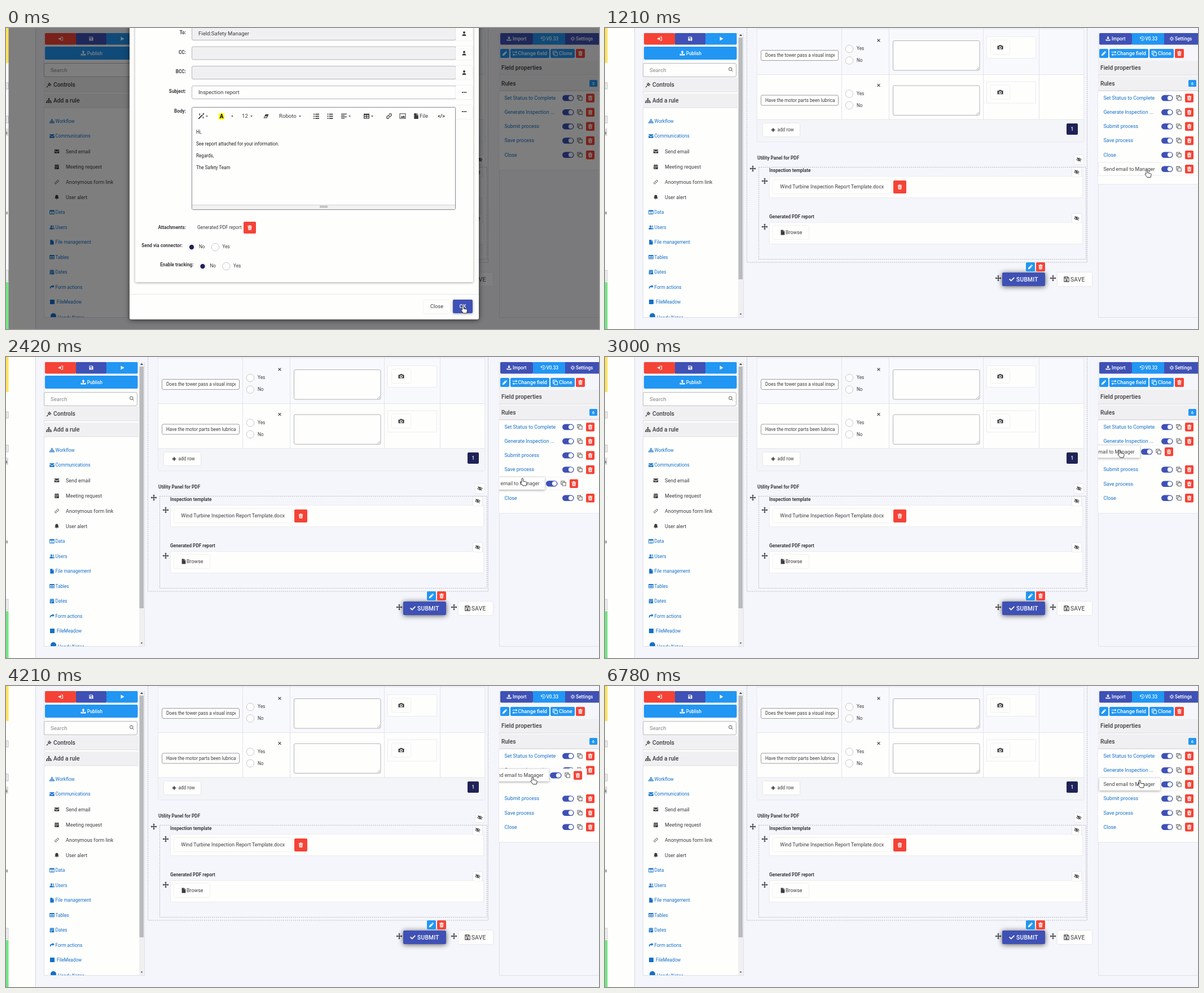
An HTML page for the animation above (6.85 s loop, 1051 by 533 pixels).

```html
<!DOCTYPE html>
<html lang="en">
<head>
<meta charset="utf-8">
<title>Form designer: reordering a rule</title>
<style>
html, body { margin: 0; width: 100%; height: 100%; overflow: hidden; background: #f5f6fb; }
svg { display: block; width: 1051px; height: 533px; font-family: Roboto, sans-serif; }
text { white-space: pre; }
.soft { filter: drop-shadow(0 .5px 1px rgba(0,0,0,.13)); }
.lift { filter: drop-shadow(0 1.5px 2px rgba(0,0,0,.36)); }
.glow { filter: drop-shadow(0 1px 5px rgba(0,0,0,.65)); }
</style>
</head>
<body>
<svg id="stage" viewBox="0 0 1051 533"></svg>
<script>
const WHITE = '#fefefd', INK = '#3c3c40', BLUE = '#2196f3', INDIGO = '#3f51b5',
  RED = '#f44336', LINK = '#1470c8', NAVY = '#1f2257', GREY = '#f0f0f2', LINE = '#dfe1e8';

// Icons on a 16 x 16 grid; a leading ~ means outlined instead of filled.
const ICONS = {
  exit: 'M0 6h5V2l6 6-6 6v-4H0zM9 1h7v14H9v-2h5V3H9z',
  save: 'M1 1h11l3 3v11H1zM3 3v4h8V3zM8 9a2 2 0 100 4 2 2 0 100-4z',
  floppy: '~M1 1h11l3 3v11H1zM4 1v5h7V1M8 9a2 2 0 100 4 2 2 0 100-4z',
  play: 'M3 1l12 7-12 7z',
  upload: 'M8 0l5 5h-3v6H6V5H3zM0 10h4v2h8v-2h4v5H0z',
  download: 'M6 0h4v5h3l-5 6-5-6h3zM0 10h3v2h10v-2h3v5H0z',
  search: '~M6.500 1a5.500 5.500 0 100 11 5.500 5.500 0 000-11zM10.500 10.500L15 15',
  gavel: 'M9 0l7 7-2 2-7-7zM6 3l7 7-2 2-3-3-6 7-2-2 7-6-3-3z',
  sitemap: 'M6 1h4v4H9v2h5v4h2v4h-4v-4V9H9v2h1v4H6v-4h1V9H4v6H0v-4h2V7h5V5H6z',
  mail: 'M0 2h16v2L8 9 0 4zM0 6l8 5 8-5v8H0z',
  calendar: 'M1 2h3V0h2v2h4V0h2v2h3v3H1zM1 6h14v10H1zM4 8v2h3V8zM9 8v2h3V8zM4 12v2h3v-2z',
  link: '~M7 9a3 3 0 004 0l3-3a3 3 0 00-4-4L8 4M9 7a3 3 0 00-4 0l-3 3a3 3 0 004 4l2-2',
  bell: 'M8 0c5 1 5 4 5 7 0 3 1 4 2 5H1c1-1 2-2 2-5 0-3 0-6 5-7zM6 13h4a2 2 0 01-4 0z',
  data: 'M0 1h16v14H0zM2 5v8h5V5zM9 5v8h5V5z',
  users: 'M6 2a3 3 0 110 6 3 3 0 010-6zM0 15c0-8 12-8 12 0zM11 2a3 3 0 110 6zM13 15c0-3 0-4-2-6 4 0 5 2 5 6z',
  file: 'M2 0h7v5h5v11H2zM10 0l4 4h-4z',
  table: 'M0 1h16v14H0zM2 5v3h5V5zM9 5v3h5V5zM2 10v3h5v-3zM9 10v3h5v-3z',
  share: 'M10 1l6 5-6 5V8C5 8 3 10 3 15-1 9 2 4 10 4z',
  trash: 'M1 2h4l1-2h4l1 2h4v2H1zM2 5h12l-1 11H3zM5 7v7h1V7zM7.500 7v7h1V7zM10 7v7h1V7z',
  pencil: 'M0 16l1-5 8-8 4 4-8 8zM10 2l2-2 4 4-2 2z',
  swap: 'M0 3h11V0l5 4-5 4V5H0zM16 11H5V8l-5 4 5 4v-3h11z',
  clone: '~M5 5h10v10H5zM11 5V1H1v10h4',
  history: '~M1 3v4h4M2 7a6.500 6.500 0 112 5M8 4v5l3 1',
  gear: '~M8 4a4 4 0 100 8 4 4 0 000-8zM8 0v4M8 12v4M0 8h4M12 8h4M2.500 2.500l3 3M10.500 10.500l3 3M2.500 13.500l3-3M10.500 5.500l3-3',
  hidden: '~M1 8c3-6 11-6 14 0-3 6-11 6-14 0zM8 6a2 2 0 100 4 2 2 0 000-4M2 1l12 14',
  move: 'M8 0l3 3H9v4h4V5l3 3-3 3V9H9v4h2l-3 3-3-3h2V9H3v2L0 8l3-3v2h4V3H5z',
  cross: 'M3 1l5 5 5-5 2 2-5 5 5 5-2 2-5-5-5 5-2-2 5-5-5-5z',
  camera: 'M0 4h4l1-2h6l1 2h4v10H0zM8 5a4 4 0 100 8 4 4 0 000-8zM8 7a2 2 0 110 4 2 2 0 010-4z',
  plus: 'M6 1h4v5h5v4h-5v5H6v-5H1V6h5z',
  check: 'M0 8l2-2 4 4 8-8 2 2L6 14z',
  user: 'M8 0a4 4 0 110 8 4 4 0 010-8zM1 16c0-9 14-9 14 0z',
  dots: 'M0 6h4v4H0zM6 6h4v4H6zM12 6h4v4h-4z',
  caret: 'M2 4h12l-6 7z',
  wand: 'M0 14L10 4l2 2L2 16zM11 3l3-3 2 2-3 3zM3 1h2v5H3zM12 9h2v5h-2z',
  eraser: 'M6 2h10l-5 12H0zM4 9l-1 3h7l1-3z',
  bullets: 'M0 1h3v3H0zM5 1h11v3H5zM0 7h3v3H0zM5 7h11v3H5zM0 13h3v3H0zM5 13h11v3H5z',
  align: 'M0 1h16v2H0zM0 5h10v2H0zM0 9h16v2H0zM0 13h10v2H0z',
  image: 'M0 1h16v14H0zM1.500 2.500v11h13v-11zM3 12l3-5 2 3 3-4 3 6z'
};

const rect = (x, y, w, h, fill = WHITE, rx = 0, stroke = 'none', extra = '') =>
  `<rect x="${x}" y="${y}" width="${w}" height="${h}" rx="${rx}" fill="${fill}" stroke="${stroke}" ${extra}/>`;
const soft = (x, y, w, h, rx = 2, fill = WHITE) => rect(x, y, w, h, fill, rx, 'none', 'class="soft"');
const outline = (x, y, w, h, stroke, fill = WHITE) => rect(x + .5, y + .5, w - 1, h - 1, fill, 2.5, stroke);
// cy is the middle of the capitals
const text = (x, cy, str, size = 8.9, fill = INK, weight = 400, extra = '') =>
  `<text x="${x}" y="${cy + size * .36}" font-size="${size}" fill="${fill}" font-weight="${weight}" ${extra}>${str}</text>`;
const label = (x, cy, str, extra) => text(x, cy, str, 8.2, INK, 700, extra);
const END = 'text-anchor="end"', MID = 'text-anchor="middle"';
const icon = (name, cx, cy, size = 10, fill = INK) => {
  const d = ICONS[name], s = size / 16, line = d[0] === '~';
  return `<path transform="translate(${cx - size / 2} ${cy - size / 2}) scale(${s})" d="${line ? d.slice(1) : d}" ` +
    (line ? `fill="none" stroke="${fill}" stroke-width="1.8"/>` : `fill="${fill}" fill-rule="evenodd"/>`);
};
const path = (d, stroke = LINE, extra = '') => `<path d="${d}" fill="none" stroke="${stroke}" ${extra}/>`;
const radio = (x, y, on) => `<circle cx="${x}" cy="${y}" r="6.700" fill="${WHITE}" stroke="${on ? '#ececf0' : '#c9c9cc'}"/>` +
  (on ? `<circle cx="${x}" cy="${y}" r="4.200" fill="${NAVY}"/>` : '');
const square = (x, y, w, h, name, fill) => rect(x, y, w, h, fill, 2) + icon(name, x + w / 2, y + h / 2, 8.5, WHITE);
const header = (x, y, w, str, pad) => rect(x, y, w, 25, GREY) + path(`M${x} ${y + 25}h${w}`, '#dedee2') +
  text(x + pad, y + 12.8, str, 10.25, INK, 500);

function edgeWindow() {
  return rect(0, 0, 52, 533) + rect(0, 0, 4.500, 62, '#ffe25a') + rect(0, 450, 4.500, 83, '#72e583') +
    rect(0, 97, 4, 11, GREY, 0, '#bbb') + rect(0, 156, 4, 12, GREY, 0, '#bbb') + rect(0, 178, 4, 13, '#ddd') +
    text(-1, 185, 's', 7, '#333') + text(0, 327, 'll', 7, '#333') + rect(0, 429, 4, 19, GREY, 0, '#ccc') +
    path('M52.500 0v533', '#d5d7df');
}

function leftPanel() {
  const items = [['sitemap', 'Workflow'], ['mail', 'Communications'], ['mail', 'Send email', 1],
    ['calendar', 'Meeting request', 1], ['link', 'Anonymous form link', 1], ['bell', 'User alert', 1],
    ['data', 'Data'], ['users', 'Users'], ['file', 'File management'], ['table', 'Tables'],
    ['calendar', 'Dates'], ['share', 'Form actions'], ['', 'FileMeadow']];
  const frame = rect(67.500, 9.500, 178, 503, WHITE, 0, LINE) +
    rect(69, 9, 55, 20.500, RED, 2) + rect(124, 9, 54, 20.500, INDIGO) + rect(178, 9, 55.500, 20.500, BLUE, 2) +
    icon('exit', 97, 19, 8, WHITE) + icon('save', 151, 19, 8, WHITE) + icon('play', 206, 19, 8, WHITE) +
    rect(69, 33, 164.500, 23, BLUE, 2) + icon('upload', 137, 44.500, 9, WHITE) + text(143.700, 44.700, 'Publish', 8.2, WHITE, 500) +
    outline(67, 62, 166, 25, '#b5b6ba') + text(79, 74.500, 'Search', 9.6, '#85868c') + icon('search', 223, 73.500, 8) +
    header(67, 88, 168, 'Controls', 17) + header(67, 116, 168, 'Add a rule', 17) +
    icon('gavel', 76, 101, 9) + icon('sitemap', 76, 128.500, 9.500) +
    rect(236, 9, 9, 503, '#f0f0f1') + rect(236.500, 17, 7.500, 428, '#babbbe') +
    icon('caret', 240.500, 507, 5) + `<path d="M238 14h5l-2.500-3z" fill="${INK}"/>`;
  let y = 165;
  const list = items.map(([name, str, sub], i) => {
    if (i) y += sub ? 27.1 : 26.45;
    return sub ? icon(name, 90, y, 8.500) + text(106, y, str) :
      (name ? icon(name, 81.500, y, 8.500, LINK) : rect(78, y - 4, 8, 8, LINK)) + text(name ? 87.500 : 90, y, str, 8.2, LINK);
  }).join('');
  const cutOff = `<circle cx="84" cy="510" r="5" fill="${LINK}"/>` + text(92, 513, 'Handy Notes', 8.2, LINK);
  return frame + `<g clip-path="url(#list)">${list}${cutOff}</g>`;
}

function tableRow(y, question) {
  return icon('cross', 485, y + 22, 6.500) +
    outline(276, y + 39, 138, 19, '#9c9da1') +
    text(284, y + 48.500, question, 8.2, INK, 400, 'clip-path="url(#cell)"') +
    radio(433, y + 37) + text(446, y + 36.500, 'Yes', 8.2) + radio(433, y + 57.500) + text(446, y + 57.500, 'No', 8.2) +
    outline(510, y + 22, 154.500, 53.500, '#b0b1b5') + path(`M658 ${y + 74}l5-5M661 ${y + 74}l2-2`, '#888', 'stroke-width=".7"') +
    rect(676.500, y + 15.500, 87, 38, WHITE, 0, '#ececf1') + soft(684, y + 22, 33, 24) + icon('camera', 700.500, y + 34, 10);
}

function formArea() {
  const dash = 'stroke-dasharray="2 1.500"';
  const eye = (x, y) => soft(x, y, 16, 16) + icon('hidden', x + 8, y + 8, 9);
  const card = y => rect(291.500, y + .5, 555, 38, WHITE, 0, '#ececf1');
  return path('M251.500 0V415H854.500V0', '#b9bbc4', dash) +
    soft(270, -4, 578, 205, 0) + rect(270, 0, 578, 82, '#f8f9fd') + rect(270, 162, 578, 39, '#f4f5f9') +
    path('M270 1.500h578M270 82.500h578M270 162h578M419.500 0v162M503.500 0v162M670.500 0v162M769.500 0v162', '#e2e4ea') +
    tableRow(0, 'Does the tower pass a visual inspection?') + tableRow(79.500, 'Have the motor parts been lubricated?') +
    soft(280, 169, 65, 23) + icon('plus', 298, 180.500, 7.500) + text(305.500, 180.500, 'add row', 8.2) +
    rect(818, 169, 20, 20, NAVY, 2) + text(828, 179, '1', 8.4, WHITE, 500, MID) +
    rect(272.500, 246.500, 580, 163, 'none', 0, '#b9bbc4', dash) +
    label(270, 230, 'Utility Panel for PDF') + eye(832, 225) +
    label(291, 252.300, 'Inspection template') + card(262) + eye(828, 247) +
    soft(298, 269, 209, 24) + text(310.300, 281, 'Wind Turbine Inspection Report Template.docx') + square(511, 270, 23, 23, 'trash', RED) +
    label(291, 334, 'Generated PDF report') + card(344) + eye(828, 329) +
    soft(298, 350, 63, 24) + icon('file', 315, 362, 9) + text(320, 362, 'Browse') +
    [[262, 249], [283, 271], [283, 352], [697, 443], [794, 443]].map(p => icon('move', ...p, 11)).join('') +
    rect(704, 433, 76, 24, INDIGO, 2, 'none', 'class="glow"') + icon('check', 721, 445, 10, WHITE) +
    text(729, 445, 'SUBMIT', 10.25, WHITE, 500, 'letter-spacing=".25"') +
    square(746, 415, 16, 16, 'pencil', BLUE) + square(764, 415, 16, 16, 'trash', RED) +
    soft(802, 433, 61, 24) + icon('floppy', 818, 445, 9.500) + text(825, 445, 'SAVE', 10.25, INK, 400, 'letter-spacing=".25"');
}

const PITCH = 25.150, slotY = i => 123.8 + i * PITCH;
const controls = () => rect(986, -5, 20.500, 10.500, INDIGO, 5.2) + `<circle cx="1001" cy=".2" r="4.100" fill="${WHITE}"/>` +
  icon('clone', 1017, 0, 9.500, '#666') + square(1028, -7.500, 15, 15.500, 'trash', RED);

function rightPanel() {
  const rules = ['Set Status to Complete', 'Generate Inspection ...', 'Submit process', 'Save process', 'Close'];
  return rect(874.500, 9.500, 180, 503, '#f5f6fb', 0, LINE) +
    rect(876, 9, 58, 20.500, INDIGO, 2) + rect(934, 9, 57, 20.500, BLUE) + rect(991, 9, 60, 20.500, INDIGO) +
    icon('download', 891.500, 19, 8, WHITE) + text(898, 19.300, 'Import', 8.2, WHITE, 500) +
    icon('history', 952, 19, 8.500, WHITE) + text(957.500, 19.300, 'V0.33', 8.2, WHITE, 500) +
    icon('gear', 1004.500, 19, 8, WHITE) + text(1010, 19.300, 'Settings', 8.2, WHITE, 500) +
    square(876, 37, 16, 16, 'pencil', BLUE) + rect(894, 37, 69, 16, BLUE, 2) + icon('swap', 902, 45, 9, WHITE) +
    text(907.500, 45, 'Change field', 9.2, WHITE, 500) + rect(965, 37, 43, 16, BLUE, 2) +
    icon('clone', 973.500, 45, 9, WHITE) + text(980, 45, 'Clone', 9.2, WHITE, 500) + square(1010, 37, 16, 16, 'trash', RED) +
    header(874, 58, 177, 'Field properties', 4) + header(874, 86, 177, 'Rules', 4) +
    rect(1034, 92, 14, 12, BLUE, 1.500) + text(1041, 98, '5', 7.500, WHITE, 500, 'id="badge" ' + MID) +
    `<rect id="sheet" class="soft" x="874" y="112" width="180" height="139" fill="${WHITE}"/>` +
    rules.map(str => `<g class="rule">${text(883.500, 0, str, 8.9, LINK)}${controls()}</g>`).join('') +
    `<g clip-path="url(#rules)"><g id="moved">${rect(874, -11.500, 177, 23, WHITE, 0, '#f4f4f6')}
      <rect id="handle" x="876" y="-11" width="108" height="22" fill="${WHITE}"/>
      ${text(883.500, 0, 'Send email to Manager', 8.9, LINK, 400, 'id="movedText"')}${controls()}</g></g>`;
}

function dialog() {
  const field = (y, name, str, ico, fill) => label(319, y - 1.500, name, END) +
    outline(329, y - 12, 469, 24, '#b4b7bf', fill) + text(341, y, str, 9.6) +
    soft(797, y - 12, 30, 24) + icon(ico, 812, y, 8);
  const choice = (x, y, name) => label(x - 16, y - 2.500, name, END) + radio(x, y, true) + text(x + 13, y - .5, 'No', 8.2) +
    radio(x + 42, y) + text(x + 54.500, y - .5, 'Yes', 8.2);
  const caret = x => icon('caret', x, 156.500, 5);
  return rect(219, -20, 619, 536, WHITE, 3, 'none', 'class="glow"') +
    rect(229, -20, 599, 470, WHITE, 2, 'none', 'class="lift"') +
    field(10, 'To:', 'Field:Safety Manager', 'user', GREY) + field(44.500, 'CC:', '', 'user', GREY) +
    field(79, 'BCC:', '', 'user', GREY) + field(114, 'Subject:', 'Inspection report', 'dots') +
    label(319, 147.500, 'Body:', END) + soft(797, 137, 30, 24) + icon('dots', 812, 148, 8) +
    rect(329.500, 140.500, 467, 181, WHITE, 2, '#8f9094', 'class="soft"') +
    icon('wand', 346, 156, 11) + caret(356) + rect(377, 151, 10, 11, '#ffff00') + text(382, 156.500, 'A', 10, '#000', 700, MID) + caret(401) +
    text(418, 156, '12', 9.6) + caret(435) + icon('eraser', 461, 156, 9) + text(484, 156, 'Roboto', 9.6) + caret(521) +
    icon('bullets', 550, 156, 10) + icon('bullets', 574.500, 156, 10) + icon('align', 599, 156, 10) + caret(609) +
    icon('table', 639, 156, 10) + caret(649) + icon('link', 679, 156, 11) + icon('image', 703, 156, 11) +
    icon('file', 727, 156, 10) + text(733, 156, 'File', 9.6) + text(771.500, 156, '&lt;/&gt;', 9, INK, 700, MID) +
    ['Hi,', 'See report attached for your information.', 'Regards,', 'The Safety Team']
      .map((str, i) => text(337, 184 + i * 21.100, str, 8.15, '#222')).join('') +
    rect(330, 313, 466, 8, '#f2f2f3') + path('M330 313.500h466', '#d0d0d4') + path('M556 315.500h14M556 317.500h14', '#999') +
    label(319, 353, 'Attachments:', END) + text(339, 353, 'Generated PDF report', 8.2) + square(421, 343, 22, 21, 'trash', RED) +
    choice(329, 388, 'Send via connector:') + choice(348.500, 422, 'Enable tracking:') +
    path('M219 471.500h619', '#e5e5e8') + soft(740, 482, 47, 23) + text(763.500, 493, 'Close', 9.2, INK, 400, MID) +
    rect(792, 481, 35, 24, INDIGO, 2, 'none', 'class="lift"') + `<circle id="ripple" cy="493" cx="809" fill="${WHITE}"/>` +
    text(809.500, 492.500, 'OK', 9.2, WHITE, 500, MID);
}

const clip = (id, ...box) => `<clipPath id="${id}">${rect(...box)}</clipPath>`;
const stage = document.getElementById('stage');
stage.innerHTML = `<defs>${clip('list', 67, 141, 168, 371)}${clip('cell', 277, 0, 130, 200)}${clip('rules', 874, 111, 177, 175)}</defs>` +
  rect(0, 0, 1051, 533, '#f5f6fb') + edgeWindow() + leftPanel() + formArea() + rightPanel() +
  `<g id="modal">${rect(4.500, 0, 1047, 533, '#000', 0, 'none', 'opacity=".5"')}${dialog()}</g>
  <path id="cursor" d="M-4-6c0-1.700 2.600-1.700 2.600 0v4l4.800 1c1.500.3 2 1 1.600 3l-1 4h-6l-3.800-5c-.5-1 .7-2 1.800-.7z" fill="#fff" stroke="#222" stroke-width=".9"/>`;

const el = id => document.getElementById(id);
const rules = [...document.querySelectorAll('.rule')];

// Keys are [time, x, y].
const POINTER = [[30, 812.500, 499], [280, 816, 496], [750, 816, 496], [920, 890, 395], [1060, 985, 280], [1200, 963, 258.500],
  [1890, 963, 258.500], [2420, 918, 222], [2570, 915, 209], [3000, 915, 172], [3280, 915, 168], [3600, 918, 162],
  [4000, 927, 164], [4210, 936, 168], [4670, 951, 175], [5000, 950.500, 174]];
const ROW = [[1890, 0, slotY(5)], [2420, -29, 224], [2570, -36, 207], [3000, -36, 167.500], [3320, -36, 161],
  [3600, -34, 153], [4000, -29, 154], [4210, -22, 158], [4670, 0, 170], [4999, 0, 170], [5000, 0, 168.700],
  [6460, 0, 168.700], [6780, 0, slotY(2)]];

function along(keys, t) {
  const i = keys.findIndex(k => k[0] > t);
  if (i < 1) return keys[i ? keys.length - 1 : 0].slice(1);
  const [a, b] = [keys[i - 1], keys[i]], p = (t - a[0]) / (b[0] - a[0]);
  return [a[1] + (b[1] - a[1]) * p, a[2] + (b[2] - a[2]) * p];
}
const place = (node, x, y) => node.setAttribute('transform', `translate(${x} ${y})`);

function draw(t) {
  const added = t >= 420, hover = t >= 1130, dragged = t >= 1890;
  el('modal').setAttribute('opacity', t < 420 ? 1 : t < 500 ? .5 : 0);
  const ripple = Math.min(1, Math.max(0, (t - 30) / 250));
  el('ripple').setAttribute('r', 12 * ripple);
  el('ripple').setAttribute('opacity', .25 * (1 - ripple));
  el('badge').textContent = added ? 6 : 5;
  el('sheet').setAttribute('height', added ? 164 : 139);

  const [x, y] = along(ROW, t);
  const slot = y < 180 ? 2 : y < 206 ? 3 : y < 228 ? 4 : 5;
  rules.forEach((rule, i) => place(rule, 0, slotY(i >= slot ? i + 1 : i)));
  const moved = el('moved');
  moved.style.display = added ? '' : 'none';
  place(moved, x, y);
  el('handle').style.display = hover ? '' : 'none';
  el('handle').setAttribute('class', dragged ? 'lift' : 'soft');
  el('movedText').setAttribute('fill', hover ? '#444' : LINK);
  place(el('cursor'), ...along(POINTER, t));
}

function tick() {
  draw(performance.now() % 6850);
  requestAnimationFrame(tick);
}
tick();
</script>
</body>
</html>
```
